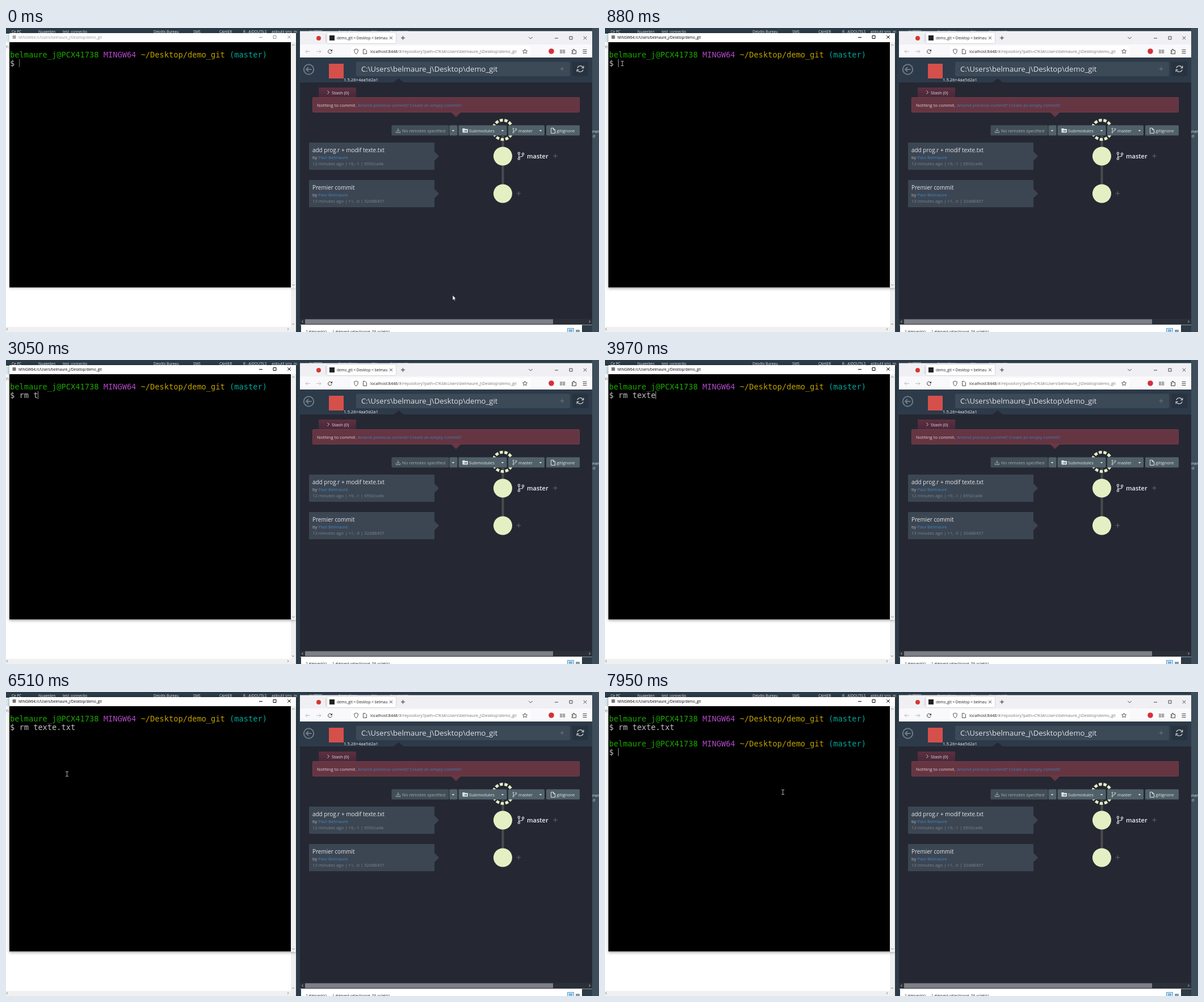
Animation of 1045 by 536 pixels, one loop 8 s. Source, as an HTML page with a canvas:

```html
<!DOCTYPE html>
<html lang="fr">
<head>
<meta charset="utf-8">
<title>rm texte.txt</title>
<style>
html, body { margin: 0; width: 100%; height: 100%; overflow: hidden; background: #2c3b47; }
canvas { display: block; }
</style>
</head>
<body>
<canvas id="stage" width="1045" height="536"></canvas>
<script>
const c = document.getElementById('stage').getContext('2d');
const LOOP = 8000, USER = 'belmaure_j', AUTHOR = 'Paul Belmaure';
const SANS = '"Open Sans", "Noto Sans", sans-serif';
const MONO = '"DejaVu Sans Mono", monospace';
const CELL = 8.236, LEFT = 7, ROW = 14.8, TOP = 40.2;
const COMMAND = 'rm texte.txt';
const KEY_TIMES = [1790, 2190, 2340, 3050, 3300, 3550, 3800, 3970, 4570, 4870, 5190, 5490];
const CURSOR_OFF = [[1330, 1790], [2850, 3050], [6010, 6520], [7030, 7130]];
const FOCUS = 780, ENTER = 7130, REPLY = 7650;

function rect(x, y, w, h, fill, r = 0, stroke) {
  c.beginPath();
  c.roundRect(x, y, w, h, r);
  if (fill) { c.fillStyle = fill; c.fill(); }
  if (stroke) { c.strokeStyle = stroke; c.lineWidth = 1; c.stroke(); }
}

function text(s, x, y, size, color, weight = 400, family = SANS) {
  c.font = `${weight} ${size}px ${family}`;
  c.fillStyle = color;
  c.fillText(s, x, y);
  return x + c.measureText(s).width;
}

function line(color, width, ...paths) {
  c.strokeStyle = color;
  c.lineWidth = width;
  c.beginPath();
  for (const p of paths)
    for (let i = 0; i < p.length; i += 2) i ? c.lineTo(p[i], p[i + 1]) : c.moveTo(p[0], p[1]);
  c.stroke();
}

function poly(fill, ...p) {
  c.fillStyle = fill;
  c.beginPath();
  for (let i = 0; i < p.length; i += 2) c.lineTo(p[i], p[i + 1]);
  c.fill();
}

function disc(x, y, r, fill) {
  c.fillStyle = fill;
  c.beginPath();
  c.arc(x, y, r, 0, 7);
  c.fill();
}

function arc(x, y, r, from, to, color, width) {
  c.strokeStyle = color;
  c.lineWidth = width;
  c.beginPath();
  c.arc(x, y, r, from, to);
  c.stroke();
}

const plus = (x, y, r, color, w = 1) => line(color, w, [x - r, y, x + r, y], [x, y - r, x, y + r]);
const cross = (x, y, r, color, w = 1) =>
  line(color, w, [x - r, y - r, x + r, y + r], [x - r, y + r, x + r, y - r]);
const chevron = (x, y, r, color, dir = 1) =>
  line(color, 1, [x - r, y - r / 2 * dir, x, y + r / 2 * dir, x + r, y - r / 2 * dir]);
const sideChevron = (x, y, r, color, dir = 1) =>
  line(color, 1, [x - r / 2 * dir, y - r, x + r / 2 * dir, y, x - r / 2 * dir, y + r]);
const caret = (x, y) => poly('#e2e6e6', x - 2.3, y - 1, x + 2.3, y - 1, x, y + 1.6);

function windowButtons(min, max, close, y, color) {
  line(color, 1, [min - 3, y + .5, min + 3, y + .5]);
  rect(max - 2.5, y - 2.5, 5, 5, null, 0, color);
  cross(close, y, 2.7, color);
}

function reload(x, y, r, color, w) {
  arc(x, y, r, -2.9, -.5, color, w);
  arc(x, y, r, .25, 2.6, color, w);
  line(color, w, [x + r + .5, y - r, x + r + .5, y - 1.5, x + r - 3, y - 1.5],
    [x - r - .5, y + r, x - r - .5, y + 1.5, x - r + 3, y + 1.5]);
}

function branch(x, y, s, color) {
  for (const [dx, dy] of [[-3, -4], [-3, 4], [3, -3]]) arc(x + dx * s, y + dy * s, 1.4 * s, 0, 7, color, s);
  line(color, s, [x - 3 * s, y - 2.5 * s, x - 3 * s, y + 2.5 * s],
    [x + 3 * s, y - 1.5 * s, x + 2.5 * s, y + .4 * s, x - 3 * s, y + 1.5 * s]);
}

function drawDesktop() {
  rect(0, 0, 1045, 536, '#2c3b47');
  rect(1033, 0, 12, 536, '#3d4d5a');
  const labels = [['Ce PC', 10], ['Nuagelien', 57], ['test_connectio', 100], ['Dépôts Bureau', 260],
    ['SMS', 330], ['CAHIER', 376], ['R - AIDOUTILS', 418], ['aidoutil sms_m', 468], ['AUTRES', 534],
    ['formations', 586], ['bis', 645], ['documents', 676]];
  for (const [s, x] of labels) text(s, x, 9, 6.4, '#e8ecef');
  text('ments', 1033, 185, 6.4, '#e8ecef');
  text('ci', 1034, 193, 6.4, '#e8ecef');

  rect(0, 10, 511, 526, '#fff');
  rect(0, 11, 6, 14, '#d8ecf2');
  text('Fi', 0, 36, 6.4, '#777');
  rect(502, 459, 9, 68, '#f0f0f0');
  rect(0, 527, 511, 9, '#f0f0f0');
  chevron(506, 522, 2, '#888');
  sideChevron(497, 531, 2, '#888');
  sideChevron(2, 531, 2, '#888', -1);

  rect(520, 521, 495, 15, '#fff');
  text('2 élément(s)', 528, 537.5, 6.5, '#333');
  text('1 élément sélectionné  56 octet(s)', 575, 537.5, 6.5, '#333');
  rect(989.5, 529.5, 11, 9, '#cfe6f7', 0, '#4a9ad4');
  line('#3a7fae', 1, [992, 532.5, 998, 532.5], [992, 534.5, 998, 534.5]);
  rect(1004, 532, 7, 5, '#8a9aa5');
}

function drawBrowserChrome() {
  rect(518, 5.5, 515, 518, '#f0f0f4');
  rect(518, 29, 515, 23, '#f9f9fb');
  disc(551, 18, 4, '#d8362f');
  line('#c8c8d0', 1, [563.5, 11, 563.5, 25]);
  rect(565.5, 7.5, 122, 20, '#fff', 2, '#d6d6dc');
  rect(570, 13, 9, 9, '#222');
  c.save();
  c.beginPath(); c.rect(583, 8, 89, 20); c.clip();
  text('demo_git < Desktop < ' + USER, 583, 20.3, 6.45, '#222');
  c.restore();
  cross(678.5, 17.5, 2.3, '#333');
  plus(699.5, 17.5, 3.5, '#333');
  chevron(924.5, 17.5, 3.2, '#444');
  windowButtons(970, 995.5, 1020.5, 17.5, '#444');

  for (const [x, d] of [[532, -1], [551, 1]])
    line('#b9b9c0', 1, [x - 4, 41.5, x + 4, 41.5], [x + d, 38.5, x + 4 * d, 41.5, x + d, 44.5]);
  arc(571, 41.5, 3.3, .3, 5.5, '#333', 1);
  poly('#333', 575, 37.5, 575, 41, 571.5, 41);
  rect(608, 32, 316, 18, '#fff', 2);
  c.strokeStyle = '#555';
  c.beginPath();
  c.moveTo(617, 37); c.lineTo(620.5, 38.5);
  c.quadraticCurveTo(620.5, 44, 617, 46);
  c.quadraticCurveTo(613.5, 44, 613.5, 38.5);
  c.closePath(); c.stroke();
  line('#555', 1, [629.5, 37.5, 633, 37.5, 635.5, 40, 635.5, 45.5, 629.5, 45.5, 629.5, 37.5]);
  c.save();
  c.beginPath(); c.rect(640, 33, 266, 16); c.clip();
  const x = text('localhost:8448', 642, 44, 7.15, '#222');
  text(`/#/repository?path=C%3A\\Users\\${USER}\\Desktop\\demo_git`, x, 44, 7.15, '#77777d');
  c.restore();
  const fade = c.createLinearGradient(896, 0, 907, 0);
  fade.addColorStop(0, '#fff0');
  fade.addColorStop(1, '#fff');
  rect(896, 34, 11, 14, fade);
  const star = [];
  for (let i = 0; i <= 10; i++) {
    const r = i % 2 ? 1.9 : 4.3, a = i * Math.PI / 5 - Math.PI / 2;
    star.push(914.5 + r * Math.cos(a), 41.5 + r * Math.sin(a));
  }
  line('#444', .9, star);
  disc(961, 41, 4.8, '#d5303a');
  rect(976, 38, 4.3, 7, '#aaa');
  rect(981, 38, 4.3, 7, '#aaa');
  line('#444', 1, [997.5, 39.5, 999.5, 39.5, 999.5, 37.5, 1001.5, 37.5, 1001.5, 39.5, 1004.5, 39.5,
    1004.5, 45.5, 997.5, 45.5, 997.5, 43, 999, 43, 999, 41.5, 997.5, 41.5, 997.5, 39.5]);
  for (const y of [38.5, 41.5, 44.5]) line('#444', 1, [1016.5, y, 1023.5, y]);
}

function button(x, w, label, tx, fill = '#51616a', color = '#dfe4e4') {
  rect(x, 171.5, w, 18, fill, 1.5);
  text(label, tx, 183.7, 7.7, color);
}

function commit(y, title, info) {
  rect(534, y, 221, 48, '#3c4653', 1);
  poly('#3c4653', 755, y + 16, 763, y + 24, 755, y + 32);
  text(title, 540, y + 17, 9.95, '#e4e6e9');
  const x = text('by ', 540, y + 28.8, 7.7, '#b0b5bc');
  text(AUTHOR, x, y + 28.8, 7.7, '#4385c4');
  text(info, 540, y + 40, 7.7, '#7b838e');
}

function drawPage() {
  rect(518, 52, 515, 461, '#252833');
  rect(518, 52, 515, 44, '#2d3a49');
  poly('#252833', 683, 96, 692, 89, 701, 96);
  arc(533.5, 73, 8.7, 0, 7, '#707a84', 2);
  line('#707a84', 2, [529, 73, 538.5, 73], [533, 69, 529, 73, 533, 77]);
  rect(569, 63, 26, 26, '#d5504b');
  text('1.5.26+4aa5d2a1', 595, 93.5, 7.67, '#eceef0');
  rect(617, 59.5, 377, 25.5, '#3c4957', 2);
  text(`C:\\Users\\${USER}\\Desktop\\demo_git`, 626, 77, 13.1, '#dfe2e6');
  plus(980, 72, 3.5, '#6e7883');
  rect(998, 59.5, 28, 25.5, '#283340', 2);
  reload(1012, 72, 5.3, '#e6e9ec', 1.1);

  const tab = c.createLinearGradient(0, 105, 0, 122);
  tab.addColorStop(0, '#5e3040');
  tab.addColorStop(1, '#48283a');
  rect(551, 105, 66, 17, tab, 1);
  sideChevron(568, 113.5, 3, '#d8ccd0');
  text('Stash (0)', 574, 116.6, 7.7, '#e6dfe2');
  rect(540.5, 122.5, 470, 26, '#653542', 1, '#743b48');
  poly('#693744', 785, 149, 801, 149, 793, 157);
  text('Nothing to commit.', 548, 138.5, 7.7, '#dcd3d6');
  text('Amend previous commit? Create an empty commit?', 620, 138.5, 7.6, '#427fbd');

  rect(873.5, 190, 4, 102, '#4a4b4d');
  c.setLineDash([5.5, 2.75]);
  arc(875.5, 179.5, 17, 0, Math.PI * 2, '#e4f0c3', 5);
  c.setLineDash([]);
  disc(875.5, 226, 16.5, '#e4f0c3');
  disc(875.5, 292, 16.5, '#e4f0c3');

  button(679.5, 101, 'No remotes specified', 698, '#424e57', '#a2acb0');
  line('#a2acb0', 1, [691, 177, 691, 182], [688.5, 180, 691, 182.5, 693.5, 180],
    [687.5, 182, 687.5, 184.5, 694.5, 184.5, 694.5, 182]);
  button(781.5, 14, '', 0);
  caret(788, 181);
  button(797.5, 85, 'Submodules', 816);
  rect(804.5, 177, 4, 3, '#dfe4e4');
  rect(804.5, 178, 9.5, 6.5, '#dfe4e4', 1);
  line('#51616a', 1, [807, 181.5, 812, 181.5], [810, 179.5, 812, 181.5, 810, 183.5]);
  caret(875, 181);
  button(885, 64, 'master', 903);
  branch(896.5, 180.7, .8, '#dfe4e4');
  caret(942, 181);
  button(952, 59, '.gitignore', 968.5);
  line('#dfe4e4', 1, [960.5, 176.5, 964.5, 176.5, 967.5, 179.5, 967.5, 185.5, 960.5, 185.5, 960.5, 176.5],
    [964.5, 176.5, 964.5, 179.5, 967.5, 179.5]);

  commit(202, 'add prog.r + modif texte.txt', '12 minutes ago | +9, -1 | 6592ca4b');
  commit(268, 'Premier commit', '13 minutes ago | +1, -0 | 32d88457');
  branch(907.5, 225.7, 1.2, '#cfd2d6');
  text('master', 918, 230, 11, '#eef0f2', 600);
  plus(968, 225.7, 3.7, '#626671');
  plus(903.5, 291.7, 3.7, '#626671');

  rect(518, 513, 515, 10, '#2b3038');
  rect(527, 513.5, 437, 8.5, '#7c7f85');
  sideChevron(522.5, 517.7, 2, '#c4c6c9', -1);
  sideChevron(1028.5, 517.7, 2, '#c4c6c9');
}

function termText(s, col, row, color) {
  text(s, LEFT + col * CELL, TOP + row * ROW + 11.5, 13.68, color, 400, MONO);
  return col + s.length;
}

function prompt(row) {
  let col = termText(USER + '@PCX41738 ', 0, row, '#1ca800');
  col = termText('MINGW64 ', col, row, '#b148c6');
  col = termText('~/Desktop/demo_git ', col, row, '#c0a000');
  termText('(master)', col, row, '#00a89a');
}

function drawTerminal(t) {
  const active = t >= FOCUS;
  c.save();
  c.shadowColor = active ? '#0006' : '#0003';
  c.shadowBlur = active ? 5 : 4;
  c.shadowOffsetY = 1;
  rect(6, 9, 505, 449, '#fff');
  c.restore();
  rect(11.5, 13, 6, 6, active ? '#777' : '#aaa');
  text(`MINGW64:/c/Users/${USER}/Desktop/demo_git`, 22, 18.5, 6.3, active ? '#000' : '#999');
  windowButtons(449, 473.5, 499, 16, active ? '#000' : '#999');
  rect(6, 25, 496, 432.5, '#000');
  rect(502, 25, 9, 432.5, '#f0f0f0');
  chevron(506.5, 30, 2.2, '#888', -1);
  chevron(506.5, 453, 2.2, '#888');

  const typed = KEY_TIMES.filter(k => t >= k).length;
  prompt(0);
  termText('$ ' + COMMAND.slice(0, typed), 0, 1, '#bfbfbf');
  let col = 2 + typed, row = 1;
  if (t >= ENTER) { col = 0; row = 2; }
  if (t >= REPLY) {
    prompt(3);
    termText('$', 0, 4, '#bfbfbf');
    col = 2; row = 4;
  }
  if (!CURSOR_OFF.some(([a, b]) => t >= a && t < b))
    rect(Math.floor(LEFT + col * CELL), Math.round(TOP + row * ROW), 1, 14, active ? '#999' : '#777');
}

function pointerAt(t) {
  const mix = (a, b, k) => a + (b - a) * k;
  if (t < 1730) {
    const k = Math.min(1, Math.floor(t / 50) * 50 / 650), e = k * k * (3 - 2 * k);
    return [mix(787, 30, e), mix(470.5, 62, e)];
  }
  if (t >= 6360 && t < 7080) {
    const k = Math.min(1, (Math.floor((t - 6360) / 61) + 1) / 7), j = 1 - k;
    return [j * j * 41 + 2 * j * k * 120 + k * k * 188, j * j * 66 + 2 * j * k * 205 + k * k * 119.5];
  }
  if (t >= 7380) {
    const k = Math.max(0, Math.min(1, Math.floor((t - 7750) / 50) / 4));
    return [mix(188, 313, k), mix(119.5, 176, k)];
  }
}

function drawPointer(t) {
  const p = pointerAt(t);
  if (!p) return;
  const x = Math.round(p[0]), y = Math.round(p[1]);
  if (x < 502) {
    line('#a8a8a8', 1, [x - 2, y - 3.5, x + 3, y - 3.5], [x - 2, y + 4.5, x + 3, y + 4.5],
      [x + .5, y - 3, x + .5, y + 4]);
    return;
  }
  const shape = [0, 0, 0, 9, 2, 7.2, 3.4, 10, 4.8, 9.4, 3.5, 6.6, 6, 6.4, 0, 0]
    .map((v, i) => v + (i % 2 ? y : x));
  poly('#fff', ...shape);
  line('#111', .6, shape);
}

const start = performance.now();

function frame() {
  const t = (performance.now() - start) % LOOP;
  drawDesktop();
  drawBrowserChrome();
  drawPage();
  drawTerminal(t);
  drawPointer(t);
  requestAnimationFrame(frame);
}

frame();
</script>
</body>
</html>
```
